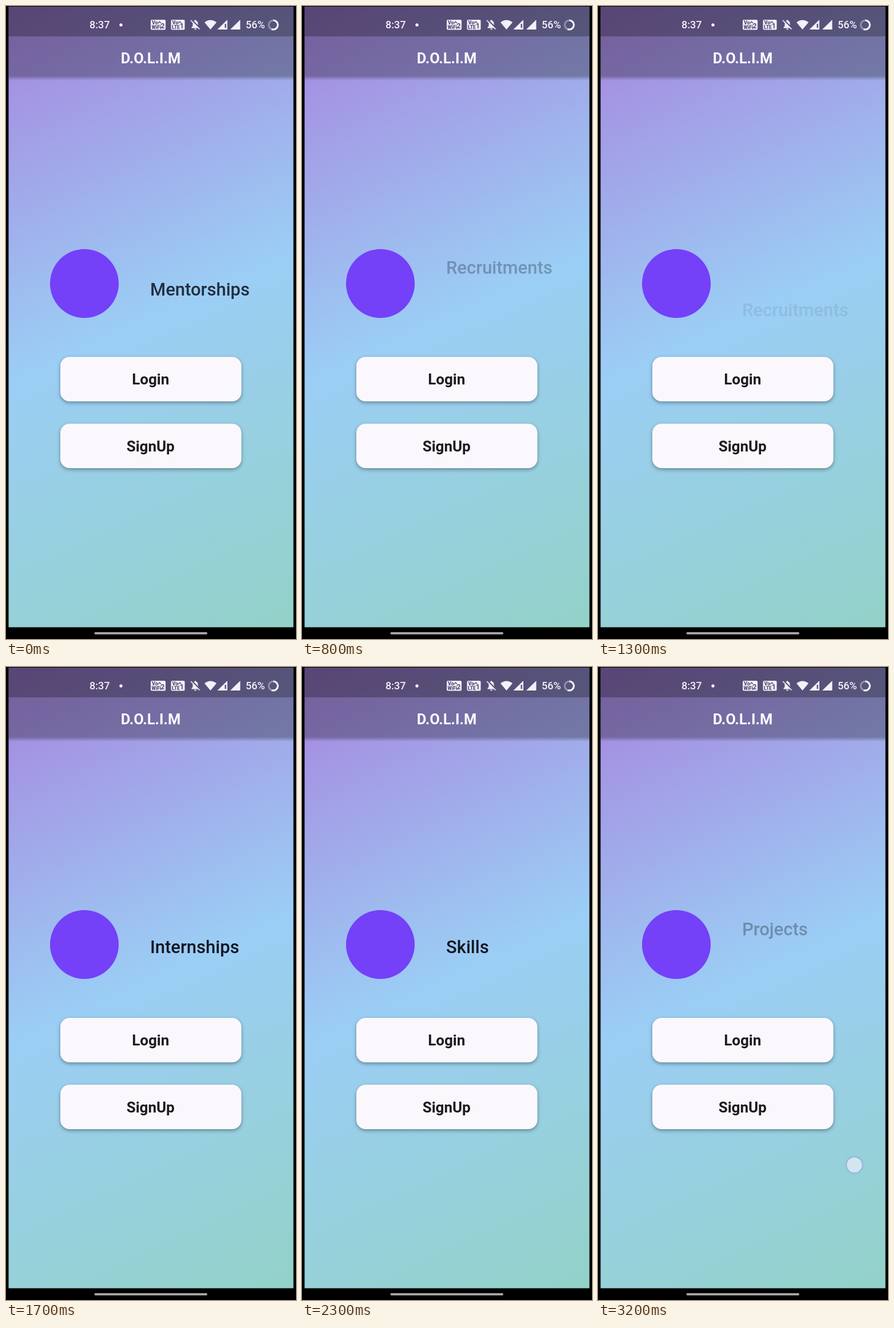
An HTML page with a canvas for the animation above (3300 ms loop, 507x1104 px).

```html
<!DOCTYPE html>
<html lang="en">
<head>
<meta charset="utf-8">
<title>Welcome screen</title>
<style>
  html, body { margin: 0; width: 100%; height: 100%; overflow: hidden; background: #000; }
  canvas { display: block; }
</style>
</head>
<body>
<canvas id="stage" width="507" height="1104"></canvas>
<script>
const W = 507, H = 1104, LOOP = 3300, STEP = 100;
const LEFT = 4.5, RIGHT = 502.5, BOTTOM = 1083.5;
const WORDS = ['Mentorships', 'Projects', 'Recruitments', 'Internships', 'Skills'];
const INK = '#f3f1f8';
const stage = document.getElementById('stage').getContext('2d');

function text(c, str, x, y, size, weight, color, align = 'left') {
  c.font = `${weight} ${size}px Roboto, sans-serif`;
  c.textAlign = align;
  c.fillStyle = color;
  c.fillText(str, x, y);
}

function box(c, x, y, w, h, r, color) {
  c.fillStyle = color;
  c.beginPath();
  c.roundRect(x, y, w, h, r);
  c.fill();
}

function disc(c, x, y, r, color) {
  c.fillStyle = color;
  c.beginPath();
  c.arc(x, y, r, 0, Math.PI * 2);
  c.fill();
}

function shape(c, path, color) {
  c.fillStyle = color;
  c.fill(new Path2D(path));
}

function ramp(c, x0, y0, x1, y1, ...colors) {
  const g = c.createLinearGradient(x0, y0, x1, y1);
  colors.forEach((color, i) => g.addColorStop(i / (colors.length - 1), color));
  return g;
}

function button(c, y, label) {
  c.save();
  c.shadowColor = 'rgba(0,0,0,0.36)';
  c.shadowBlur = 6;
  c.shadowOffsetY = 2.5;
  box(c, 95, y, 316.5, 77.5, 16, '#fbf8fd');
  c.restore();
  text(c, label, 252.7, y + 48, 26, 700, '#1d1b20', 'center');
}

function callBadge(c, x, w, kind, slot) {
  const dark = '#554c76';
  box(c, x, 24, w, 17.5, 2, INK);
  text(c, 'Vo', x + 2, 32, 9, 900, dark);
  text(c, kind, x + 1.5, 40, 8.5, 900, dark);
  text(c, slot, x + w - 1.5, 38.5, 12.5, 700, dark, 'right');
  c.strokeStyle = dark;
  c.lineWidth = 1.2;
  c.stroke(new Path2D(`M${x + 13} 30l2.5 -3l2.5 3`));
}

function bell(c) {
  shape(c, 'M324.5 38.5v-1.5l2 -2v-4.5q0 -4 3.2 -4.9v-1.1h2.6v1.1q3.2 .9 3.2 4.9v4.5l2 2v1.5z' +
    'M329 39.5h4q-.4 2 -2 2t-2 -2z', INK);
  c.lineWidth = 2.6;
  c.strokeStyle = '#5b5380';
  c.stroke(new Path2D('M324.5 24.2l15.5 15.5'));
  c.lineWidth = 1.7;
  c.strokeStyle = INK;
  c.stroke(new Path2D('M323 25l15.5 15.5'));
}

function statusBar(c) {
  text(c, '8:37', 146, 39, 18, 500, INK);
  disc(c, 201, 33, 2.7, INK);
  callBadge(c, 253, 26, 'WiFi', '2');
  callBadge(c, 288.5, 24, 'LTE', '1');
  bell(c);
  shape(c, 'M347 28.5q10.5 -8 21 0l-10.5 12.5z', INK);
  shape(c, 'M387 24v17h-17.5z', INK);
  shape(c, 'M409.5 24v17h-17.5z', INK);
  box(c, 382.5, 31, 2.5, 7, 0, '#5b5a7f');
  text(c, '56%', 419, 39, 18, 500, INK);
  c.lineWidth = 3;
  const top = -Math.PI / 2;
  for (const [share, color] of [[1, 'rgba(255,255,255,0.35)'], [0.56, INK]]) {
    c.strokeStyle = color;
    c.beginPath();
    c.arc(467.3, 33, 8, top, top + share * Math.PI * 2);
    c.stroke();
  }
}

function paintScene(c) {
  c.fillStyle = '#000';
  c.fillRect(0, 0, W, H);
  c.fillStyle = ramp(c, LEFT, 0, RIGHT, BOTTOM,
    'rgb(167,131,222)', 'rgb(155,206,245)', 'rgb(147,210,200)');
  c.fillRect(LEFT, 1, RIGHT - LEFT, BOTTOM - 1);

  const bar = 'rgba(0,0,0,0.29)', wide = RIGHT - LEFT;
  c.fillStyle = bar;
  c.fillRect(LEFT, 1, wide, 121);
  c.fillStyle = ramp(c, 0, 122, 0, 130, bar, 'rgba(0,0,0,0)');
  c.fillRect(LEFT, 122, wide, 8);
  c.fillStyle = 'rgba(0,0,0,0.26)';
  c.fillRect(LEFT, 1, wide, 52);

  statusBar(c);
  text(c, 'D.O.L.I.M', 253, 99.5, 25.5, 700, '#fbf9ff', 'center');
  disc(c, 137, 484, 60, '#7440f8');
  button(c, 612, 'Login');
  button(c, 728.5, 'SignUp');
  box(c, 154.5, 1092, 197.5, 4, 2, '#a3a3a3');
}

// Each word drops in from above, rests, then drops out below.
function paintWord(c, ms) {
  const span = 582, inEnd = 0.375, outStart = 0.7, travel = 46;
  const lag = 0.132 * Math.max(0, ms - 2700);
  const turn = (ms - lag + 430) / span;
  const phase = turn % 1;
  let shift = 0;
  if (phase < inEnd) shift = phase / inEnd - 1;
  else if (phase > outStart) shift = (phase - outStart) / (1 - outStart);
  c.globalAlpha = 1 - Math.abs(shift);
  text(c, WORDS[Math.floor(turn) % WORDS.length], 252, 499 + shift * travel, 31, 500, '#111722');
  c.globalAlpha = 1;
}

function paintTouch(c) {
  disc(c, 448.3, 868.5, 17, 'rgba(150,190,225,0.35)');
  disc(c, 448.3, 868.5, 15, '#8fb4d8');
  disc(c, 448.3, 868.5, 13.3, '#d3e5f0');
}

const scene = document.createElement('canvas');
scene.width = W;
scene.height = H;
paintScene(scene.getContext('2d'));

const start = performance.now();
function draw() {
  const ms = Math.floor(((performance.now() - start) % LOOP) / STEP) * STEP;
  stage.drawImage(scene, 0, 0);
  paintWord(stage, ms);
  if (ms >= 3200) paintTouch(stage);
  requestAnimationFrame(draw);
}
draw();
</script>
</body>
</html>
```
